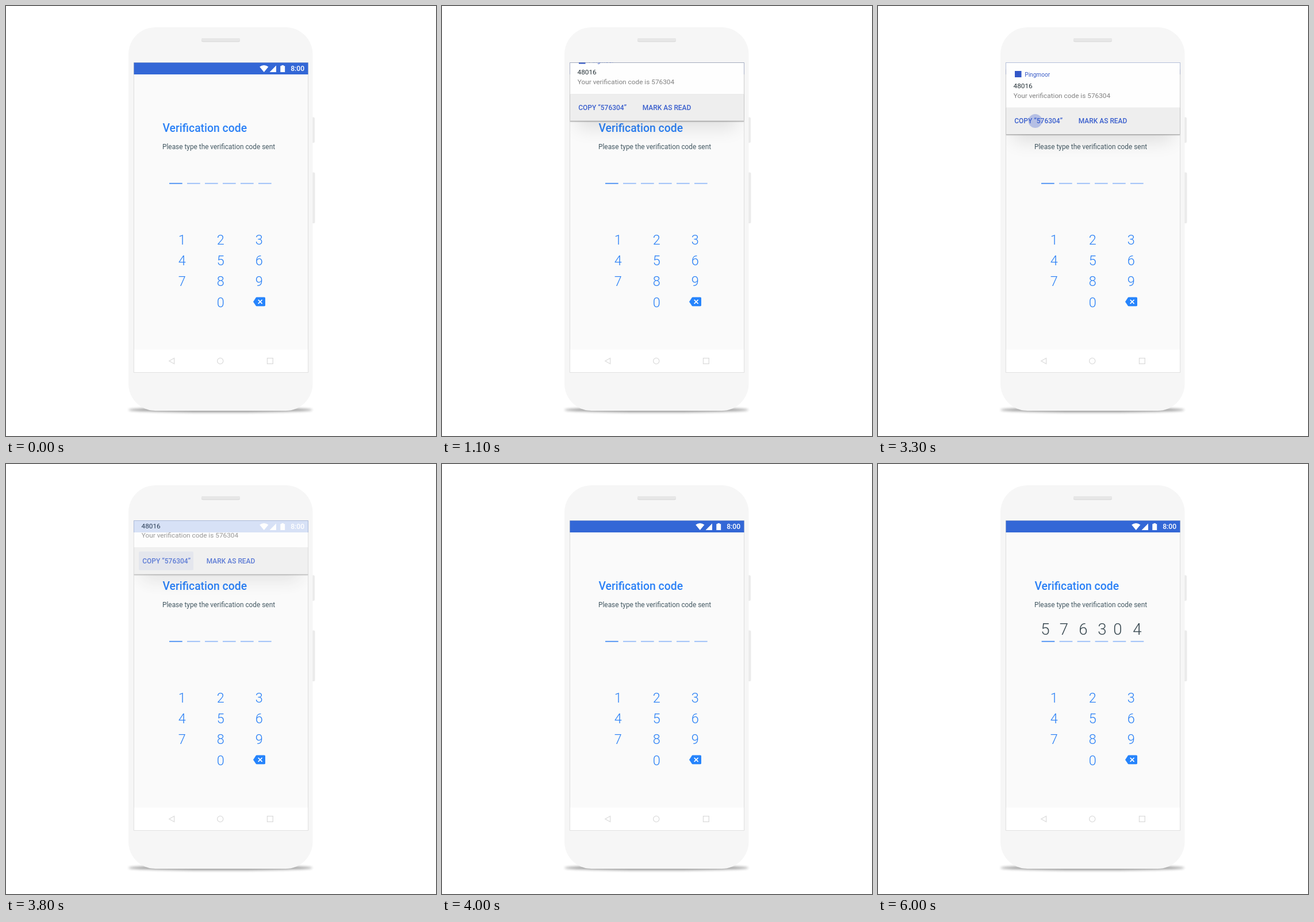
An HTML page that plays this animation: 748x748 px, repeating every 8000 ms.

```html
<!DOCTYPE html>
<html lang="en">
<head>
<meta charset="utf-8">
<title>Verification code</title>
<style>
  html, body { margin: 0; width: 100%; height: 100%; overflow: hidden; background: #fff; }
  svg { display: block; width: 100vw; height: 100vh; }
  text { font-family: Roboto, "Open Sans", sans-serif; }
  .title { font-size: 19.35px; font-weight: 500; fill: #2a80f6; }
  .hint { font-size: 11.85px; fill: #455a64; }
  .clock { font-size: 12.2px; font-weight: 500; fill: #fff; text-anchor: end; }
  .key { font-size: 23.5px; font-weight: 300; fill: #2a80f6; text-anchor: middle; }
  .digit { font-size: 27.6px; font-weight: 300; fill: #37474f; text-anchor: middle; }
  .app { font-size: 10.1px; fill: #3a5cc8; }
  .sender { font-size: 11.8px; fill: #263238; }
  .body { font-size: 11.82px; fill: #808080; }
  .action { font-size: 11.95px; font-weight: 500; fill: #3a5fcd; }
  .paste { font-size: 13.4px; fill: #37474f; }
</style>
</head>
<body>
<svg viewBox="0 0 748 748" xmlns="http://www.w3.org/2000/svg">
  <defs>
    <clipPath id="screen"><rect x="222.5" y="98.5" width="303" height="539"/></clipPath>
    <clipPath id="button"><rect x="231" y="183.5" width="95" height="32.5" rx="2"/></clipPath>
    <filter id="soft" x="-30%" y="-60%" width="160%" height="220%"><feGaussianBlur stdDeviation="16"/></filter>
    <filter id="thin" x="-10%" y="-10%" width="120%" height="120%"><feGaussianBlur stdDeviation="1"/></filter>
    <filter id="floor" x="-10%" y="-200%" width="120%" height="500%"><feGaussianBlur stdDeviation="2"/></filter>
  </defs>

  <!-- phone -->
  <ellipse cx="373" cy="702.5" rx="160" ry="4.5" fill="#000" opacity=".38" filter="url(#floor)"/>
  <g fill="#ebebeb">
    <rect x="530" y="193.5" width="7" height="44.5" rx="2"/>
    <rect x="530" y="289.5" width="7.5" height="88.5" rx="2"/>
  </g>
  <rect x="213" y="37" width="320.5" height="667" rx="47" fill="#f6f6f6"/>
  <rect x="340" y="56" width="67" height="6.5" rx="2.5" fill="#dadada"/>
  <rect x="340" y="56" width="67" height="5.3" rx="2.5" fill="#e7e7e7"/>

  <g clip-path="url(#screen)">
    <rect x="222" y="98" width="304" height="540" fill="#fafafa"/>
    <rect x="222" y="597.5" width="304" height="41" fill="#fff"/>
    <g fill="none" stroke="#dcdcdc" stroke-width="1.3">
      <path d="M292.6 612.5V622.5L283.9 617.5Z"/>
      <circle cx="372.7" cy="617.5" r="5.1"/>
      <rect x="454.5" y="612.6" width="9.8" height="9.8"/>
    </g>

    <!-- status bar -->
    <rect x="222" y="98" width="304" height="21" fill="#3367d6"/>
    <g fill="#fff">
      <path d="M441.2 105.7Q448.8 100.2 456.4 105.7L448.8 115Z"/>
      <path d="M458.6 115H470V103.6Z"/>
      <path d="M477.3 104.2H479.5V103H483V104.2H485.2V115H477.3Z"/>
    </g>
    <text class="clock" x="519.2" y="113.2">8:00</text>

    <!-- form -->
    <text class="title" x="272.5" y="218.8">Verification code</text>
    <text class="hint" x="272" y="248.6">Please type the verification code sent</text>
    <g id="lines"></g>
    <g id="digits"></g>
    <g id="keys"></g>
    <path fill="#2684fc" transform="translate(430 503.9) scale(.875)" d="M22 3H7c-.69 0-1.23.35-1.59.88L0 12l5.41 8.11c.36.53.9.89 1.59.89h15c1.1 0 2-.9 2-2V5c0-1.1-.9-2-2-2z"/>
    <path d="M438.7 511L445.6 517.9M445.6 511L438.7 517.9" stroke="#fff" stroke-width="1.75"/>

    <!-- paste menu -->
    <g id="menu">
      <rect x="373" y="301.5" width="102" height="37" rx="2" fill="#000" opacity=".4" filter="url(#thin)"/>
      <rect x="373.3" y="300.5" width="101.4" height="37" rx="1.5" fill="#fff" stroke="#000" stroke-opacity=".09" stroke-width=".6"/>
      <text class="paste" x="386" y="324.2">PASTE</text>
      <g fill="#37474f">
        <circle cx="457.6" cy="313.8" r="1.9"/>
        <circle cx="457.6" cy="319.1" r="1.9"/>
        <circle cx="457.6" cy="324.4" r="1.9"/>
      </g>
    </g>

    <!-- notification -->
    <g id="note">
      <rect x="236" y="140" width="276" height="95" fill="#000" opacity=".11" filter="url(#soft)"/>
      <rect x="222" y="110" width="304" height="114" fill="#000" opacity=".5" filter="url(#thin)"/>
      <rect x="222" y="98" width="304" height="79" fill="#fefefe"/>
      <rect x="222" y="176.5" width="304" height="46.7" fill="#eee"/>
      <rect x="238" y="113" width="11.5" height="11" fill="#3357c7"/>
      <text class="app" x="255.3" y="122.6">Pingmoor</text>
      <text class="sender" x="235.5" y="142.9">48016</text>
      <text class="body" x="235.8" y="159.6">Your verification code is 576304</text>
      <g clip-path="url(#button)"><circle id="ripple" cx="273.5" cy="200" fill="#3c5acd"/></g>
      <text class="action" x="237.3" y="204.2">COPY “576304”</text>
      <text class="action" x="348.8" y="204.2">MARK AS READ</text>
    </g>
  </g>
  <rect x="222.3" y="98.5" width="303.4" height="539" fill="none" stroke="#000" stroke-opacity=".13" stroke-width=".8"/>
</svg>
<script>
  const LOOP = 8000, STEP = 50;
  const el = id => document.getElementById(id);
  const add = (parent, tag, attrs, label = '') => {
    const node = document.createElementNS('http://www.w3.org/2000/svg', tag);
    for (const k in attrs) node.setAttribute(k, attrs[k]);
    node.textContent = label;
    el(parent).appendChild(node);
  };
  const span = (t, from, to) => Math.min(1, Math.max(0, (t - from) / (to - from)));

  for (let i = 0; i < 6; i++) {
    add('lines', 'rect', { x: 284 + 31 * i, y: 307.8, width: 22.7, height: 1.7, fill: i ? '#92b9f8' : '#3d87f3' });
  }
  [291, 323.3, 357, 390, 417, 451].forEach((x, i) =>
    add('digits', 'text', { class: 'digit', x, y: 297 }, '576304'[i]));
  for (let n = 1; n <= 10; n++) {
    const col = n === 10 ? 1 : (n - 1) % 3, row = Math.floor((n - 1) / 3);
    add('keys', 'text', { class: 'key', x: 306.2 + 67 * col, y: 414.8 + 36.3 * row }, n % 10);
  }

  function draw(t) {
    const enter = span(t, 950, 1300), leave = span(t, 3600, 4000);
    const shift = leave ? leave ** 2 : (1 - enter) ** 3;
    const note = el('note');
    note.setAttribute('transform', `translate(0 ${-125.5 * shift})`);
    note.setAttribute('opacity', enter > 0 ? 1 - leave ** 2.4 : 0);

    const press = span(t, 3300, 3600);
    el('ripple').setAttribute('r', 12 + 55 * press);
    el('ripple').setAttribute('opacity', t < 3300 ? 0 : 0.32 - 0.24 * press);

    const fill = span(t, 5600, 6000);
    el('menu').setAttribute('opacity', span(t, 4450, 4650) * (1 - fill));
    el('digits').setAttribute('opacity', fill);
    el('lines').setAttribute('transform', `translate(${0.6 * fill} 0)`);
  }

  function tick() {
    const t = performance.now() % LOOP;
    draw(Math.floor(t / STEP) * STEP);
    requestAnimationFrame(tick);
  }
  tick();
</script>
</body>
</html>
```
